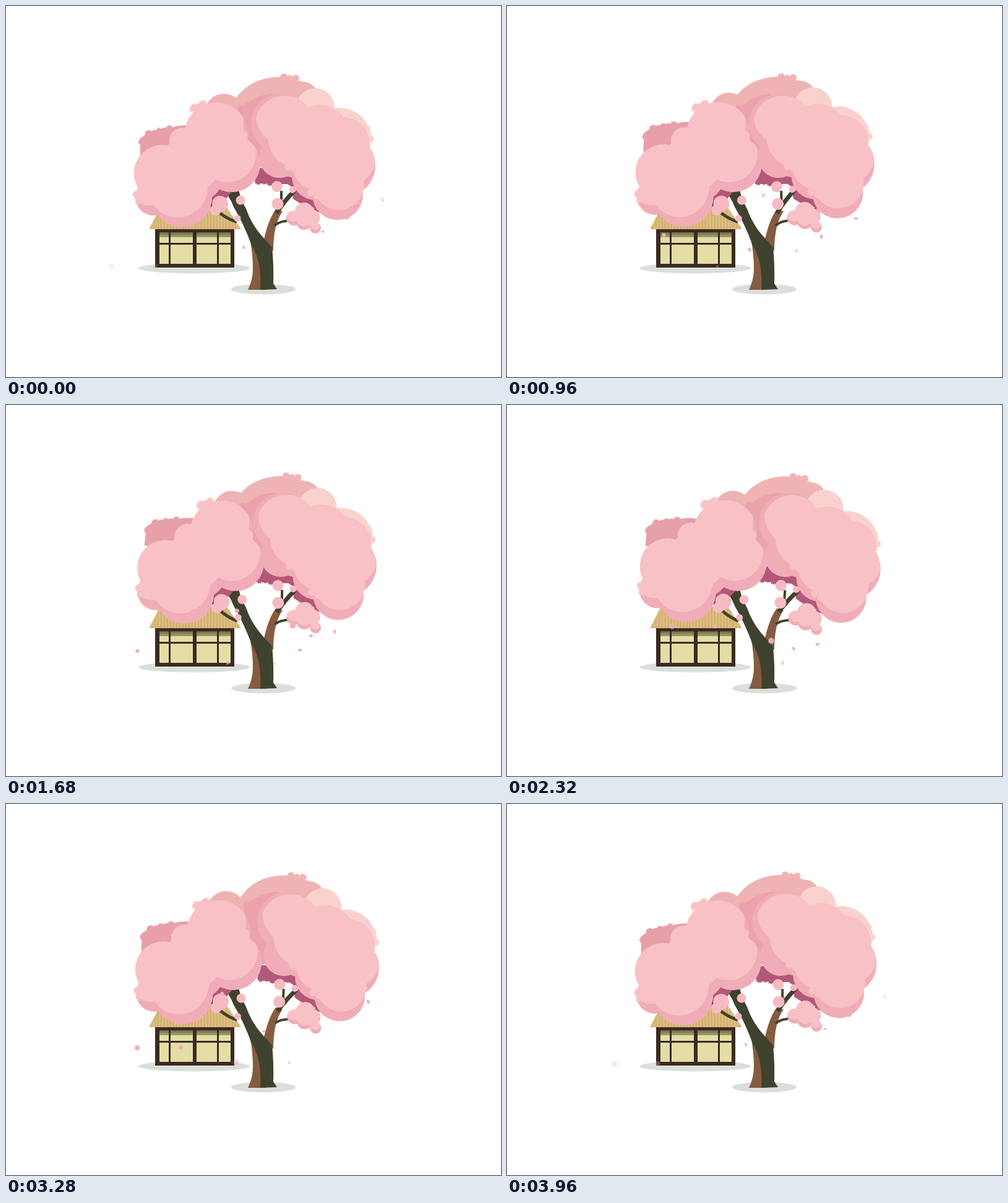
An HTML page for the animation above (4000 ms loop, 800 px wide and 600 px high).

```html
<!DOCTYPE html>
<html lang="en">
<head>
<meta charset="utf-8">
<title>Cherry tree</title>
<style>
  html, body { margin: 0; width: 100%; height: 100%; overflow: hidden; background: #fff; }
  svg { display: block; width: 800px; height: 600px; }
</style>
</head>
<body>
<svg viewBox="0 0 800 600">
  <defs>
    <g id="flower"></g>
    <path id="petal" d="M-4 0Q-1-4 4-1.5L3 0 4 1.5Q-1 4-4 0Z"/>
    <pattern id="straw" width="5" height="8" patternUnits="userSpaceOnUse">
      <path fill="#dcbd7e" d="M0 0H5V8H0Z"/><path fill="#cba96b" d="M0 0H1.3V8H0Z"/>
    </pattern>
    <linearGradient id="pane" x2="0" y2="1">
      <stop stop-color="#6f6b4b"/><stop offset=".15" stop-color="#a5a16e"/>
      <stop offset=".16" stop-color="#e2dea5"/>
    </linearGradient>
  </defs>

  <g fill="#dadfdc">
    <ellipse cx="304" cy="424" rx="90" ry="8.5"/>
    <ellipse cx="416" cy="458" rx="52" ry="8.5"/>
  </g>

  <g id="house">
    <path fill="#3b2a20" d="M241 360H369V423H241Z"/>
    <path fill="url(#pane)" d="M248 366H363V417H248Z"/>
    <path fill="none" stroke="#3b2a20" stroke-width="3" d="M264.500 363V419M342.500 363V419M246 384.500H365"/>
    <path fill="#3b2a20" d="M302 363H308V420H302Z"/>
    <path fill="url(#straw)" d="M249 326H357L380 361H231Z"/>
  </g>

  <g id="backLeft">
    <path fill="#e7a0a9" d="M217 245V214Q236 199 262 199 275 192 294 193L310 245Z"/>
    <circle cx="352" cy="173" r="31" fill="#efb2b3"/>
  </g>

  <g id="crown">
    <path fill="#efb3b3" d="M358 185C366 135 406 112 450 115L478 122Q496 123 502 137V230H360Z"/>
    <path fill="#eaa3ab" d="M376 260V168Q399 145 428 142L470 150V260Z"/>
  </g>

  <g id="underside" fill="#b4587a">
    <path d="M399 262H470V298L455 288H430L404 286Z"/>
    <path d="M462 292H512V336L503 326 480 322 464 312Z"/>
  </g>

  <g id="trunk">
    <path fill="#855c40" d="M415 386Q423 346 436 329L447 332Q432 353 432 396ZM394 376 430 400 420 459H391Q399 442 399 425 399 400 394 376Z"/>
    <path fill="#3f422e" d="M346 292 376 297Q379 312 388 328C398 356 412 371 430 390Q433 420 432 449L438 458 411 459Q414 414 397 387 384 352 368 325 361 306 346 292Z"/>
  </g>

  <g id="left">
    <path fill="#b4587a" d="M320 296H368L350 319 330 326Z"/>
    <path fill="none" stroke="#3f422e" stroke-width="5" d="M328 312Q333 326 347 336T373 349"/>
  </g>
  <g id="right">
    <path fill="none" stroke="#3f422e" stroke-width="4" d="M445 299V323M434 355Q443 347 462 347"/>
    <path fill="none" stroke="#3f422e" stroke-width="7" d="M437 335Q451 314 466 299"/>
  </g>
  <g id="petals"></g>
</svg>
<script>
const LOOP = 4000, STEP = 40, GROUND = 425;
const LIGHT = "#f8c1c6", SHADE = "#f0adb7", PEACH = "#f9d2cd";
const $ = id => document.getElementById(id);

function add(parent, tag, attrs) {
  const node = document.createElementNS("http://www.w3.org/2000/svg", tag);
  for (const key in attrs) node.setAttribute(key, attrs[key]);
  return parent.appendChild(node);
}

function circles(parent, fill, ...lobes) {
  for (const [cx, cy, r] of lobes) add(parent, "circle", { cx, cy, r, fill });
}

// Shaded lobes, with a lit copy shifted towards the light and clipped inside.
function cloud(id, dx, dy, ...lobes) {
  const clip = add($(id), "clipPath", { id: `${id}Clip${dy}` });
  circles(clip, LIGHT, ...lobes);
  circles($(id), SHADE, ...lobes);
  const inside = add($(id), "g", { "clip-path": `url(#${clip.id})` });
  circles(add(inside, "g", { transform: `translate(${dx} ${dy})` }), LIGHT, ...lobes);
}

// Blossoms of alternating size that fray the edge from one point to another.
function fray(id, fill, [x0, y0], [x1, y1]) {
  const count = Math.round(Math.hypot(x1 - x0, y1 - y0) / 9);
  for (let i = 0; i <= count; i++) {
    const x = x0 + (x1 - x0) * i / count, y = y0 + (y1 - y0) * i / count;
    add($(id), "use", {
      href: "#flower", fill,
      transform: `translate(${x} ${y}) rotate(${i * 29}) scale(${i % 2 ? 0.9 : 1.2})`
    });
  }
}

for (let i = 0; i < 5; i++)
  add($("flower"), "path", { d: "M0 0Q-4-3-1.5-5.5L0-4 1.5-5.5Q4-3 0 0Z", transform: `rotate(${i * 72})` });

fray("backLeft", "#e7a0a9", [220, 220], [231, 207]);
fray("backLeft", "#e7a0a9", [231, 207], [264, 199]);
fray("crown", "#efb3b3", [449, 115], [468, 117]);
fray("crown", "#eaa3ab", [380, 165], [389, 163]);
fray("underside", "#b4587a", [408, 283], [427, 285]);
fray("underside", "#b4587a", [492, 316], [503, 328]);

fray("left", PEACH, [302, 167], [319, 158]);
cloud("left", -7, -16,
  [252, 270, 45], [340, 207, 51], [285, 218, 21], [365, 255, 46], [300, 265, 55], [285, 310, 48], [239, 309, 30]);
fray("left", LIGHT, [211, 305], [213, 316]);
fray("left", LIGHT, [304, 164], [317, 160]);
circles($("left"), "#f7bac2", [346, 320, 13], [339, 330, 9], [379, 314, 7.5], [374, 343.5, 5.5]);

circles($("right"), PEACH, [500, 164, 31], [540, 215, 50]);
fray("right", PEACH, [583, 199], [589, 215]);
circles($("right"), SHADE, [444, 190, 48], [442, 245, 33]);
cloud("right", 2, -16,
  [450, 193, 48], [507, 206, 46], [545, 222, 42], [547, 258, 50], [536, 305, 41], [500, 276, 38], [470, 230, 48]);
fray("right", LIGHT, [456, 260], [465, 264]);
fray("right", LIGHT, [493, 302], [502, 308]);
circles($("right"), "#f7bac2", [438, 292, 9], [439, 320, 9.5], [463, 297, 5.5]);
cloud("right", 0, -6,
  [465, 343, 12], [482, 333, 15], [494, 342, 13], [500, 359, 9], [482, 349, 13]);

// Each falls from [time, x, y] at the speed of its kind until it lands.
function drift(shape, vx, vy, ...origins) {
  return origins.map(([start, x, y], i) => ({
    start, x, y, vx, vy,
    scale: 0.95 - i % 4 * 0.1, spin: i * 53,
    life: (GROUND - y) / vy,
    node: add($("petals"), "use", { href: "#" + shape, fill: "#f2adb8" })
  }));
}

const falling = [
  ...drift("flower", -0.057, 0.038, [600, 525, 316], [1300, 325, 319], [860, 420, 302], [2320, 404, 270]),
  ...drift("petal", -0.046, 0.032, [2700, 612, 301], [3880, 614, 309], [2700, 444, 349],
    [2280, 591, 310], [700, 404, 386], [1040, 522, 353])
];

// Swing relative to time zero, lowest at `low`; `skew` sharpens the peak.
function sway(t, low, skew = 0) {
  const wave = time => {
    const a = (time - low) / LOOP * 2 * Math.PI;
    return skew * Math.cos(2 * a) - Math.cos(a);
  };
  return wave(t) - wave(0);
}

function turn(id, angle, x, y) {
  $(id).setAttribute("transform", `rotate(${angle} ${x} ${y})`);
}

function draw(t) {
  const gust = sway(t, 730);
  turn("right", 3.05 * gust, 443, 366);
  turn("underside", 2.6 * gust, 443, 366);
  turn("crown", 2.5 * gust, 432, 368);
  turn("left", 2.3 * sway(t, 250, 0.2), 372, 365);
  turn("backLeft", 3.15 * sway(t, -30), 390, 300);

  for (const { start, x, y, vx, vy, scale, spin, life, node } of falling) {
    const age = (t - start + LOOP) % LOOP;
    const angle = spin + age * 0.12;
    node.setAttribute("transform", `translate(${x + vx * age} ${y + vy * age}) rotate(${angle}) scale(${scale})`);
    node.setAttribute("opacity", Math.max(0, Math.min(1, age / 200, (life - age) / 400)));
  }
}

const begin = performance.now();
function frame() {
  const t = (performance.now() - begin) % LOOP;
  draw(Math.floor(t / STEP) * STEP);
  requestAnimationFrame(frame);
}
frame();
</script>
</body>
</html>
```
